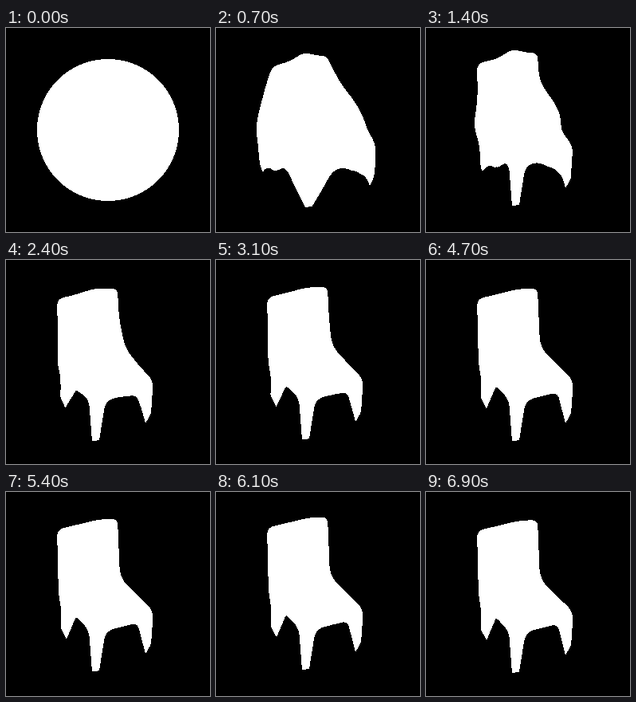
Recreate the animation shown at these times as an HTML page. Size 256 by 256 pixels, loop 7 s.

```html
<!DOCTYPE html>
<html lang="en">
<head>
<meta charset="utf-8">
<title>Sphere to chair</title>
<style>
  html, body { margin: 0; width: 100%; height: 100%; overflow: hidden; background: #000; }
  svg { display: block; width: 100vw; height: 100vh; }
</style>
</head>
<body>
<svg viewBox="0 0 256 256">
  <rect width="256" height="256" fill="#000"/>
  <path id="shape" fill="#fff" shape-rendering="crispEdges"/>
</svg>
<script>
const LOOP = 7000, STEP = 100, FORM = 1400, SETTLE = 700, COUNT = 400;
const shape = document.getElementById('shape');
const lerp = (a, b, u) => a + (b - a) * u;

// Corners of the finished chair, clockwise: x, y, rounding
const corners = [
  [64, 47, 9], [118, 34, 12], [140, 33.5, 8],              // backrest
  [143, 108, 14], [185, 149, 11],                          // seat
  [182, 191, 4], [175, 203, 0], [165, 164, 8],             // right leg
  [125, 174, 12], [117, 224, 0], [108, 225.5, 0], [104, 173, 10], // front leg
  [88, 156, 3], [76, 184.5, 0], [68.5, 170, 2],            // left leg
  [69, 145, 6], [66, 128, 10]
];

// Swellings of the unfinished chair: x, y, radius, push x, push y
const bumps = [
  [150, 104, 25, 22, 0],
  [108, 36, 14, 0, -6],
  [88, 155, 14, 0, 20],
  [163, 166, 16, -4, 12],
  [76, 184, 12, -5, -2],
  [66, 125, 25, -5, 0]
];

function toward([x, y, r], [px, py]) {
  const d = Math.hypot(px - x, py - y);
  const u = Math.min(r, d / 2) / d;
  return [lerp(x, px, u), lerp(y, py, u)];
}

function roundedPath(list) {
  const n = list.length;
  return 'M' + list.map((c, i) => {
    const a = toward(c, list[(i + n - 1) % n]);
    const b = toward(c, list[(i + 1) % n]);
    return `${a}Q${c[0]},${c[1]} ${b}`;
  }).join('L') + 'Z';
}

function sample(d) {
  shape.setAttribute('d', d);
  const length = shape.getTotalLength();
  return Array.from({ length: COUNT }, (_, i) => shape.getPointAtLength(length * i / COUNT));
}

const chair = sample(roundedPath(corners)).map(({ x, y }) => {
  let dx = 0, dy = 0;
  for (const [bx, by, r, px, py] of bumps) {
    const w = Math.exp(-((x - bx) ** 2 + (y - by) ** 2) / r ** 2);
    dx += px * w;
    dy += py * w;
  }
  return { x, y, dx, dy };
});

function draw(t) {
  const u = Math.min(1, t / FORM);
  const v = 1 - (1 - u) ** 3;
  const swell = Math.exp(-Math.max(0, t - FORM) / SETTLE);
  const bob = -2.2 * Math.cos((t - FORM) / 2300 * 2 * Math.PI);
  const spread = 9 * Math.sin(Math.PI * Math.min(1, t / 600));
  const points = chair.map((p, i) => {
    const a = (i / COUNT * 360 - 130) * Math.PI / 180;
    const x = lerp(128 + 89 * Math.cos(a), p.x + p.dx * swell, u);
    const y = lerp(128 + 89 * Math.sin(a), p.y + p.dy * swell + bob, v);
    const out = Math.max(0, (128 - x) / 89) * spread;
    return (x - out).toFixed(2) + ' ' + y.toFixed(2);
  });
  shape.setAttribute('d', 'M' + points.join('L') + 'Z');
}

const start = performance.now();
function tick() {
  const t = (performance.now() - start) % LOOP;
  draw(Math.floor(t / STEP) * STEP);
  requestAnimationFrame(tick);
}
tick();
</script>
</body>
</html>
```
